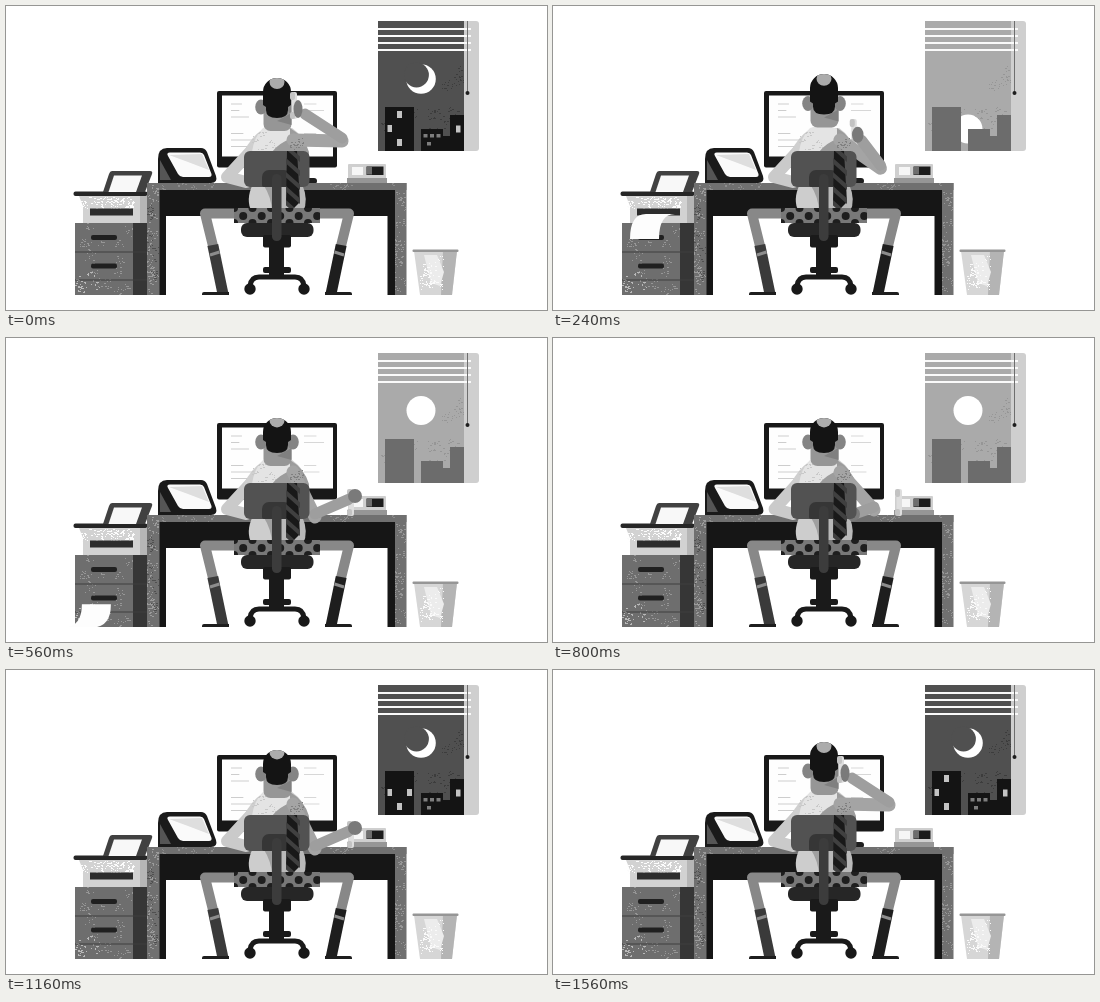
An HTML page with a canvas that plays this animation: 541x304 px, repeating every 1.6 s.

```html
<!DOCTYPE html>
<html lang="en">
<head>
<meta charset="utf-8">
<title>Desk loop</title>
<style>
html, body { margin: 0; height: 100%; overflow: hidden; background: #fff; }
canvas { display: block; width: 100vw; height: 100vh; }
</style>
</head>
<body>
<canvas width="541" height="304"></canvas>
<script>
const LOOP = 1600;
const g = document.querySelector('canvas').getContext('2d');
const gray = v => `rgb(${v},${v},${v})`;
const mix = (a, b, k) => a + (b - a) * k;

// Eased 0 to 1 between times a and b.
function ramp(t, a, b) {
  const u = Math.min(1, Math.max(0, (t - a) / (b - a)));
  return u * u * (3 - 2 * u);
}
// Rises over a..b, falls back over c..d.
const pulse = (t, a, b, c, d) => ramp(t, a, b) - ramp(t, c, d);
const bump = k => 4 * k * (1 - k);

function box(c, x, y, w, h, r = 0) {
  g.fillStyle = gray(c);
  g.beginPath();
  g.roundRect(x, y, w, h, r);
  g.fill();
}
function disc(c, x, y, rx, ry = rx) {
  g.fillStyle = gray(c);
  g.beginPath();
  g.ellipse(x, y, rx, ry, 0, 0, 7);
  g.fill();
}
function shape(c, d) {
  g.fillStyle = gray(c);
  g.fill(new Path2D(d));
}
function stroke(c, w, d, cap = 'round') {
  g.strokeStyle = gray(c);
  g.lineWidth = w;
  g.lineCap = cap;
  g.lineJoin = 'round';
  g.stroke(new Path2D(d));
}
function random(seed) {
  const next = () => (seed = (seed * 16807) % 2147483647) / 2147483647;
  next();
  next();
  return next;
}
function clipped(x, y, w, h, draw) {
  g.save();
  g.beginPath();
  g.rect(x, y, w, h);
  g.clip();
  draw();
  g.restore();
}
// Worn-print texture: clusters of small specks.
function grain(c, x, y, w, h, clusters) {
  const rnd = random(Math.round(x * 131 + y * 17 + clusters));
  const near = () => (rnd() + rnd() - 1) * 7;
  clipped(x, y, w, h, () => {
    g.fillStyle = gray(c);
    for (let i = 0; i < clusters; i++) {
      const cx = x + rnd() * w, cy = y + rnd() * h;
      for (let j = 0; j < 9; j++) {
        g.fillRect(Math.round(cx + near()), Math.round(cy + near()), rnd() < .4 ? 2 : 1, 1);
      }
    }
  });
}
function mirrored(draw) {
  draw(1);
  g.save();
  g.translate(542, 0);
  g.scale(-1, 1);
  draw(-1);
  g.restore();
}

function drawWindow(t) {
  const day = pulse(t, 40, 180, 1000, 1120);
  const sky = mix(80, 170, day), town = mix(20, 108, day);
  clipped(372, 15, 86, 130, () => {
    box(sky, 372, 15, 86, 130);
    grain(sky - 20, 372, 100, 86, 44, 14);
    grain(sky - 20, 436, 60, 22, 70, 9);

    const moonY = 73 + 92 * pulse(t, 40, 180, 1000, 1140);
    disc(255, 415, moonY, 14.8);
    disc(sky, 410.5, moonY - 4, 12.4);
    if (day > 0) {
      const sunY = 72.5 + 95 * (1 - pulse(t, 150, 340, 860, 1060));
      const stretch = ramp(t, 860, 940);
      disc(255, 415, sunY, 14.5 - 6 * stretch, 14.5 + 5 * stretch);
    }

    box(town, 379, 101, 29, 44);
    box(town, 415, 123, 22, 22);
    box(town, 436, 130, 9, 15);
    box(town, 444, 109, 14, 36);
    if (day < .3) {
      const late = t < 500 || t > 1320;
      box(195, 381.5, 119, 4.5, 7);
      box(195, 391, 133, 5, 7);
      box(195, 450, 119.5, 4.5, 7);
      box(195, late ? 391 : 401, late ? 105 : 119, 5, 7);
      for (let i = 0; i < 3; i++) box(125, 417.5 + i * 6.5, 128, 4, 3.5);
      box(125, 421, 136, 4, 3.5);
    }
  });
  box(207, 458, 15, 15, 130, [0, 3, 3, 0]);
  for (let i = 0; i < 4; i++) box(250, 372, 22 + i * 7, 93, 2);
  box(110, 461, 15, 1, 72);
  disc(30, 461.5, 87, 2);
}

// A sheet slides out of the slot, then swings over and drops.
function drawPaper(t) {
  const out = ramp(t, 50, 240), fall = Math.max(0, (t - 280) / 280) ** 1.6;
  if (!out || fall > 2) return;
  const swing = Math.min(1, fall), slide = (1 - out) * -28;
  const bx = mix(77, 58, fall), by = mix(233, 289, fall) + slide;
  const tx = mix(93, 76, fall), ty = mix(208, 266, fall) + slide;
  const cx = mix(bx, tx, swing), cy = mix(ty, by, swing);
  clipped(40, 207, 101, 97, () => shape(253,
    `M${bx} ${by}Q${cx} ${cy} ${tx} ${ty}h29Q${cx + 29} ${cy} ${bx + 29} ${by}Z`));
}

function drawCabinet(t) {
  box(110, 69, 217, 59, 72);
  box(54, 127, 217, 14, 72);
  grain(150, 69, 217, 58, 72, 14);
  grain(185, 69, 262, 26, 27, 5);
  for (const y of [245.5, 273.5]) box(62, 69, y, 72, 1);
  for (const y of [229, 257.5]) box(32, 85, y, 26, 5, 2);
  shape(210, 'M73 190H135V217H77V200Z');
  box(182, 134, 190, 7, 27);
  grain(252, 74, 191, 55, 14, 18);
  box(45, 84, 202.5, 43, 7);
  box(38, 67.5, 185.5, 74, 4.5, 2);
  shape(65, 'M106 165H144Q147 165 146 168L139 186H97L103 168Q104 165 106 165Z');
  shape(248, 'M108 169.5H136L130 186H102.5Z');
  drawPaper(t);
}

function drawMonitor() {
  box(30, 237, 172, 74, 6, 3);
  box(24, 211, 85, 120, 76.5, 2);
  box(254, 216, 89.5, 111, 61);
  const rnd = random(77);
  for (let i = 0; i < 6; i++) {
    const y = 97.5 + i * 6.5 + (i > 2 ? 10 : 0);
    box(205, 225, y, 8 + rnd() * 16, 1);
    if (i % 3 < 2) box(215, 298, y, 8 + rnd() * 14, 1);
  }
}

function drawDesk() {
  box(22, 153, 184, 236, 26);
  box(22, 153, 184, 7, 105);
  box(22, 381.5, 184, 8, 105);
  box(112, 141, 177, 259.5, 7);
  box(112, 141, 177, 12.5, 112);
  box(112, 389, 177, 11.5, 112);
  grain(155, 141, 178, 12, 110, 18);
  grain(80, 141, 178, 12, 110, 8);
  grain(150, 389, 178, 11, 110, 15);
  grain(140, 153, 177, 236, 7, 9);
}

function drawTablet() {
  shape(26, 'M152 177V153Q152 142 161 142H195Q199 142 201 146L210 170Q212 177 205 177Z');
  shape(85, 'M154 154L165 174H154Z');
  shape(250, 'M164 146.5H194Q197 146.5 198 149L205.5 168Q206 171 203 171H177Q174 171 172 168L162 150Q160 146.5 164 146.5Z');
  shape(222, 'M163 149L196 148L203 164L182 156Z');
}

function drawPhoneBase() {
  box(207, 342, 158, 38, 15, 1);
  box(150, 341, 172, 40, 5);
  box(246, 346, 161, 11, 8);
  box(28, 360.5, 160.5, 17, 8.5);
  box(110, 361, 161, 5, 7.5);
}

function drawHandset(x, y, turn) {
  g.save();
  g.translate(x, y);
  g.rotate(turn);
  box(222, -2.5, -14, 5.5, 27, 2);
  box(195, -4, -14, 5, 8, 2);
  box(195, -4, 6, 5, 7, 2);
  g.restore();
}

function drawLegs() {
  mirrored(side => {
    const sock = side > 0 ? 58 : 30;
    stroke(136, 10, 'M230 207.5H199L207.5 242', 'butt');
    stroke(sock, 11, 'M206.8 239L217 288', 'butt');
    stroke(140, 3, 'M204 249L213.5 246', 'butt');
    box(30, 196, 286, 27, 3, [2, 0, 0, 0]);
  });
}

function drawTorso() {
  shape(207, 'M257 123Q244 132 238 146V160H302V146Q298 130 286 122Z');
  shape(228, 'M257 122Q271 116 286 124L278 146H246Q248 131 257 122Z');
  shape(156, 'M284 122Q298 130 303 146V160H266V146Q273 137 284 133Z');
  grain(200, 246, 126, 30, 18, 4);
  shape(205, 'M247 178Q239 194 246 206H271V178Z');
  shape(160, 'M257 178H271V206H266Q266 192 257 178Z');
  shape(185, 'M271 178H296Q303 194 297 206H271Z');
}

function drawHead(ear, top) {
  const chin = ear + 11;
  box(150, 257.5, ear - 4, 28, 28, [4, 4, 7, 7]);
  shape(128, `M271 ${ear + 14}L285.5 ${ear + 6}V${ear + 18}Z`);
  for (const x of [255, 287]) disc(132, x, ear, 5.8, 7.5);
  const hair = new Path2D(`M257 ${top + 14}A14 14 0 0 1 285 ${top + 14}V${ear - 2}L282 ${ear}
    V${chin - 8}Q282 ${chin} 271 ${chin}Q260 ${chin} 260 ${chin - 8}V${ear}L257 ${ear - 2}Z`);
  g.save();
  g.fillStyle = gray(20);
  g.fill(hair);
  g.clip(hair);
  disc(172, 271, top + 4 - (top - 72) * .2, 7.5, 7);
  g.restore();
}

function drawChair() {
  box(82, 238, 145, 65.5, 36, 6);
  box(54, 256, 164, 29, 17, [7, 7, 2, 2]);
  // Striped tie over the backrest
  clipped(280, 145, 14, 58, () => {
    shape(25, 'M281 145H291L294 196L287 203L280 196Z');
    for (let y = 138; y < 205; y += 14) stroke(64, 4, `M277 ${y}L297 ${y + 18}`);
  });
  // Polka-dot shorts
  clipped(228, 202, 86, 15, () => {
    box(120, 228, 202, 86, 15);
    for (let x = 228; x < 320; x += 18.5) {
      disc(30, x + 9.2, 210, 4);
      disc(30, x, 202, 4);
      disc(30, x, 217, 4);
    }
  });
  box(38, 235, 217, 72.5, 14, 6);
  box(26, 257, 229, 28, 12.5, 2);
  box(26, 263, 240, 15, 30);
  box(26, 257, 261, 28, 6, 2);
  stroke(26, 5, 'M244 280Q245 271 253 271H289Q297 271 298 280');
  for (const x of [244, 298]) disc(24, x, 283, 5.7);
  box(60, 266, 168, 9.5, 67, 4.5);
}

function drawBin() {
  shape(214, 'M408 245H451L446 289H414Z');
  shape(180, 'M437 245H451L446 289H435Z');
  shape(236, 'M418 249H431L438 266L434 280L425 277Z');
  grain(250, 414, 248, 24, 36, 12);
  box(150, 406.5, 243.5, 46, 2.5, 1);
}

function drawPerson(t) {
  // The arm moves between three poses: phone at ear, phone base, keyboard.
  const away = pulse(t, 60, 420, 1180, 1440), hop = bump(away);
  const typing = pulse(t, 640, 760, 900, 1100), lift = bump(typing);
  const ex = mix(mix(336, 309, away), 321, typing) + 5 * hop;
  const ey = mix(mix(135, 179, away), 172, typing) + 5 * hop;
  const hx = mix(mix(292, 349, away), 300, typing) - 16 * hop - 10 * lift;
  const hy = mix(mix(103, 158, away), 176, typing) - 2 * hop - 36 * lift;
  const ear = 101 + 3 * away - 5 * hop, top = 72 + 8 * away - 8 * hop;
  const held = t < 580 || t > 1160;

  if (!held) drawHandset(346, 165, Math.sin(t / 12) * .2 * pulse(t, 840, 880, 1060, 1100));
  stroke(202, 12, `M256 133L${221 + typing * Math.sin(t / 25)} 171L240 176`);
  drawTorso();
  drawHead(ear, top);
  if (held) drawHandset(hx - 4, hy - 3 + 10 * away ** 3, 0);
  stroke(164, 13, `M287 134L${ex} ${ey}`);
  stroke(158, 11, `M${ex} ${ey - 3}L${mix(hx, ex, .16)} ${mix(hy, ey, .16)}`);
  grain(128, 284, 132, 14, 14, 4);
  disc(122, hx, hy, mix(4.5, 7, away), mix(9, 7, away));
}

function drawScene(t) {
  g.fillStyle = '#fff';
  g.fillRect(0, 0, 541, 304);
  drawWindow(t);
  drawCabinet(t);
  drawMonitor();
  drawDesk();
  drawTablet();
  drawPhoneBase();
  drawBin();
  drawLegs();
  drawPerson(t);
  drawChair();
}

function frame(now) {
  drawScene(now % LOOP);
  requestAnimationFrame(frame);
}
requestAnimationFrame(frame);
</script>
</body>
</html>
```
